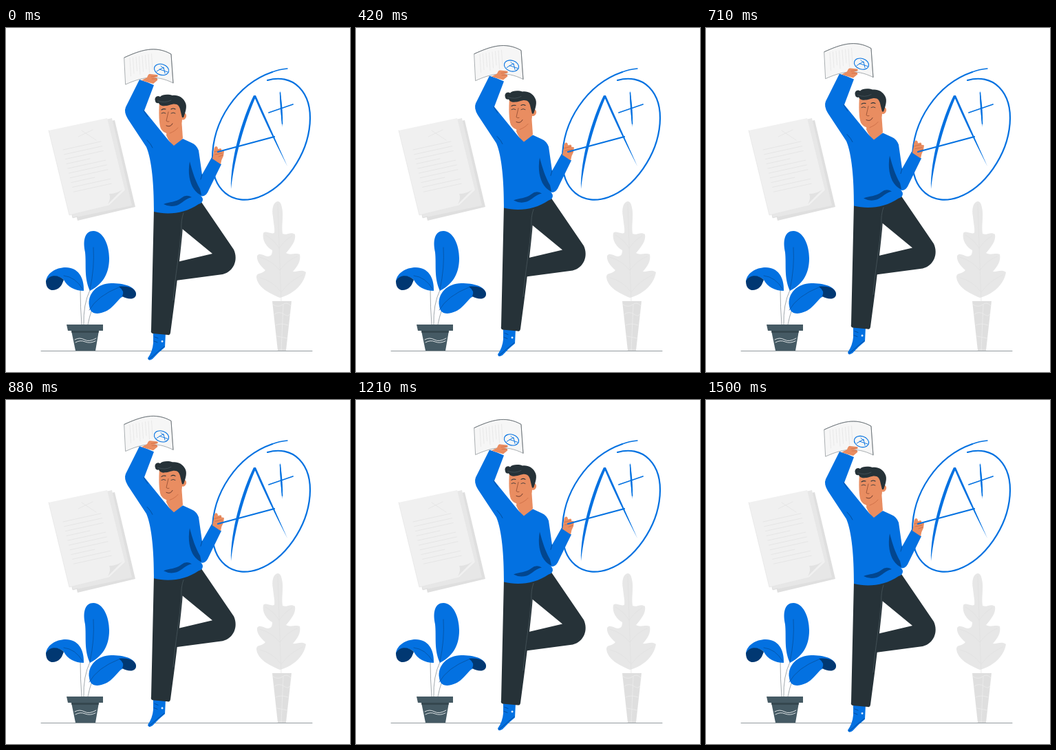
An HTML page with a canvas for the animation above (1.54 s loop, 500 by 500 pixels).

```html
<!DOCTYPE html>
<html lang="en">
<head>
<meta charset="utf-8">
<title>Top grade</title>
<style>
html, body { margin: 0; width: 100%; height: 100%; overflow: hidden; background: #fff; }
canvas { display: block; width: 100vmin; height: 100vmin; }
</style>
</head>
<body>
<canvas width="500" height="500"></canvas>
<script>
const canvas = document.querySelector('canvas');
const ctx = canvas.getContext('2d');
const LOOP = 1540;
const LIFT = 8.4;
const BLUE = '#0371e1', SHADE = '#02468f', NAVY = '#013872', INK = '#263238', SLATE = '#455a64', SKIN = '#e98d61', SKIN_DARK = '#c96b45';

ctx.lineCap = ctx.lineJoin = 'round';

function fill(path, color) {
  ctx.fillStyle = color;
  ctx.fill(new Path2D(path));
}

function line(path, color, width = 1) {
  ctx.strokeStyle = color;
  ctx.lineWidth = width;
  ctx.stroke(new Path2D(path));
}

function drawStack() {
  fill('M73 153 L158 134 L188 260 L104 280 Z', '#dfdfdf');
  fill('M67 151 L154 131 L183 258 L97 276 Z', '#e7e7e7');
  line('M67 151 L97 276 L104 274', '#d9d9d9', 0.7);
  fill('M62 149 L147 131 L173 236 L150 258 L92 272 Z', '#f0f0f0');
  fill('M169 235 L148 256 Q153 247 150 241 Q160 241 169 235 Z', '#e2e2e2');
  line('M62 149 L92 272 L150 258 L173 236', '#e4e4e4', 0.7);
  line('M110 149 L131 163 M105 158 L126 148', '#e4e4e4', 0.8);
  for (let i = 0; i < 10; i++) {
    const x = 83 + i * 1.7, y = 177 + i * 6.8;
    const width = i % 4 === 3 ? 34 : 55;
    line(`M${x} ${y} l${width} ${-width * 0.22}`, '#e3e3e3', 0.8);
  }
}

function drawGreyPlant() {
  fill(`M395 252 C388 253 386 264 388 274 C389 286 391 291 390 298
    C384 300 378 294 374 298 C372 308 378 318 387 323 C387 328 386 332 380 332
    C374 331 369 326 365 331 C364 339 370 346 377 352 C373 358 364 355 364 362
    C365 376 381 385 398 392 C415 388 433 374 436 355 C430 350 422 355 417 354
    C424 346 429 338 427 329 C421 326 414 331 407 327 C414 319 422 309 420 300
    C414 295 408 302 402 299 C400 287 404 272 401 261 C400 255 398 252 395 252 Z`, '#e7e7e7');
  line('M395 256 Q397 320 400 397 M377 301 Q389 307 397 320 M416 302 Q405 308 397 320 M369 333 Q386 338 398 352 M423 332 Q408 338 398 352 M369 363 Q387 367 400 384 M431 359 Q411 368 400 384', '#e0e0e0', 0.7);
  fill('M387 397 H415 L407 469 H395 Z', '#dfdfdf');
  line('M388 402 Q396 407 402 402 T414 404 M390 416 Q397 411 404 416 T413 415 M392 432 Q399 428 410 432 M403 402 L400 469 M394 448 L409 451', '#ededed', 0.8);
}

function drawBluePlant() {
  line('M122 381 Q112 402 113 431 M108 380 Q108 406 110 431 M125 409 Q121 420 119 431', '#89949a', 0.8);
  fill('M113 382 C114 362 104 348 87 348 C72 348 58 357 58 370 C62 360 76 358 84 366 C89 376 100 382 113 382 Z', BLUE);
  fill('M58 368 C58 380 66 383 73 380 C81 377 82 370 84 366 C76 358 63 358 58 368 Z', NAVY);
  fill('M122 382 C113 362 117 345 115 326 C111 308 115 295 127 295 C141 295 150 315 150 335 C150 359 139 373 122 382 Z', BLUE);
  fill('M121 404 C118 386 133 371 153 371 C171 371 188 375 189 387 C182 390 175 386 167 392 C158 400 152 413 133 415 C125 415 122 411 121 404 Z', BLUE);
  fill('M164 376 C180 374 190 380 189 388 C187 396 176 394 169 390 Q173 382 164 376 Z', NAVY);
  line('M122 380 Q129 348 127 319 M111 379 Q101 362 84 360 M121 410 Q133 389 164 377', '#084d94', 0.7);
  fill('M95 440 H135 L130 469 H101 Z', SLATE);
  fill('M95 440 H135 L134.5 443 H95.5 Z', '#35474f');
  fill('M88 431 H141 V440 H90 Z', SLATE);
  line('M100 453 Q107 449 114 453 T131 451 M101 457 Q108 453 115 456 T130 455', '#eef1f2', 0.9);
}

function drawGrade() {
  line('M387 64 C335 82 300 136 300 190 A94.5 62 -61 1 0 380 76', BLUE, 2.2);
  line('M409 59 Q397 60 387 64', BLUE, 1.4);
  fill('M360 98 L363 100 C347 137 333 184 327 234 C326 190 343 133 360 98 Z', BLUE);
  fill('M360 98 L363 98 L409 201 Q380 145 360 98 Z', BLUE);
  fill('M398 91 Q403 115 402 144 Q398 118 398 91 Z', BLUE);
  line('M398.5 94 L401.5 139', BLUE, 1.6);
  line('M382 123 L417 111', BLUE, 1.8);
}

function drawHeldSheet() {
  fill('M172 43 C196 32 217 25 240 38 L243 80 C217 67 196 72 174 82 Z', '#f6f6f6');
  line('M172 43 C196 32 217 25 240 38 L243 80 C217 67 196 72 174 82 Z', '#858c90', 0.7);
  line('M172 43 C196 32 217 25 240 38 L243 80', '#586166', 0.7);
  for (let i = 0; i < 8; i++) {
    const x = 180 + i * 4.5, y = 44 - i * 0.9;
    line(`M${x} ${y} L${x + 1.5} ${y + 26 - i % 3 * 3}`, '#e3e3e3', 0.7);
  }
  ctx.beginPath();
  ctx.ellipse(226, 60.5, 10.8, 7.8, 0.3, 0, Math.PI * 2);
  ctx.strokeStyle = BLUE;
  ctx.lineWidth = 1.1;
  ctx.stroke();
  line('M219 63 L229 57 L231 66 M223 60 L235 64 M225 55 L229 59', BLUE, 0.9);
}

function drawLegs() {
  fill('M214 442 L232 443 L231 464 Q222 471 213 481 Q207 485 206 480 Q213 470 214 458 Z', BLUE);
  line('M216 449 L221 451 M215 455 L220 457 M208 481 Q214 477 219 472 L230 463', SHADE, 0.8);
  fill('M227 454 a1.5 1.5 0 1 0 .1 0 Z', '#dcecff');
  fill('M250 266 L284 253 L331 322 C338 337 331 354 315 358 L247 367 L249 340 L300 328 L255 291 Z', INK);
  fill('M215 263 H259 L256 301 C251 351 245 399 239 443 Q238 447 235 446 L213 444 Q210 443 211 439 Z', INK);
  line('M258 269 Q254 280 255 294 C252 329 246 358 243 396', '#4d5b61', 0.7);
}

function drawHead() {
  fill('M234 145 L233 156 Q237 166 244 172 Q254 166 257 160 L255 132 Z', SKIN);
  fill('M223 107 C222 122 222 139 225 146 C229 153 236 155 242 152 C250 148 256 141 256 133 L255 106 Z', SKIN);
  fill('M254 125 C258 121 263 124 262 129 C261 133 257 135 254 132 Z', SKIN);
  line('M238 153 Q246 150 250 145', SKIN_DARK, 0.8);
  fill('M217 106 C215 101 220 97 224 100 C227 96 237 96 242 98 C250 97 257 101 260 107 C264 113 261 122 258 130 L256 130 L254 122 C253 117 252 113 248 111 C242 109 238 113 231 113 C227 114 223 112 222 109 C219 110 217 108 217 106 Z', INK);
  line('M221 106 Q231 110 240 105', '#526067', 0.6);
  line('M226 119 Q229 117 232 118 M240 118 Q243 116 246 118', INK, 1.1);
  line('M226 124 Q229 122 232 124 M240 124 Q243 122 246 124', INK, 0.8);
  line('M236 122 L233 135 Q235 137 237 136', '#8e4b31', 0.8);
  line('M233 142 Q239 145 242 139', '#5d3027', 0.9);
}

function drawSweater() {
  fill('M194 75 Q204 78 215 83 L201 120 L231 157 Q237 165 244 171 L257 161 L270 167 Q277 170 280 178 L285 213 L299 188 L313 198 L294 237 C291 244 285 247 280 242 L278 240 Q287 246 286 250 Q285 255 280 256 C260 270 235 272 215 267 C215 227 212 192 204 173 L177 132 Q171 122 174 115 Z', BLUE);
  fill('M267 194 C264 211 267 225 273 234 Q278 241 284 243 L282 234 C275 222 271 209 267 194 Z', SHADE);
  fill('M229 256 C238 252 246 254 255 247 Q262 241 270 246 C262 247 256 255 248 258 Q238 261 229 256 Z', SHADE);
  line('M200 120 Q203 125 206 129 M205 163 Q211 169 213 174 M285 213 L283 220', SHADE, 0.8);
}

function drawHands() {
  fill('M197 76 L205 72 Q207 66 210 67 L219 68 Q222 69 220 71 L215 72 Q222 73 220 76 L214 81 Q206 79 197 76 Z', SKIN);
  line('M211 71 L219 70 M212 74 L219 74', SKIN_DARK, 0.7);
  fill('M300 190 L302 180 Q302 173 305 172 Q308 172 308 176 L312 175 Q314 176 313 178 L317 179 L316 186 Q313 191 312 198 Z', SKIN);
  line('M303 180 L312 178 M304 184 L314 182 M309 187 L315 185', SKIN_DARK, 0.8);
}

function drawPerson() {
  drawHeldSheet();
  drawLegs();
  drawHead();
  drawSweater();
  drawHands();
}

function render(now) {
  const phase = (now + 40) % LOOP / LOOP;
  const rise = LIFT * (1 - Math.cos(phase * Math.PI * 2)) / 2;
  ctx.fillStyle = '#fff';
  ctx.fillRect(0, 0, 500, 500);
  drawStack();
  drawGreyPlant();
  line('M51 469.5 H445', '#929a9e', 1);
  drawBluePlant();
  drawGrade();
  ctx.save();
  ctx.translate(0, -rise);
  drawPerson();
  ctx.restore();
  line('M308 180 L390 158', BLUE, 2.2);
}

const start = performance.now();
function tick() {
  render(performance.now() - start);
  requestAnimationFrame(tick);
}
tick();
</script>
</body>
</html>
```
